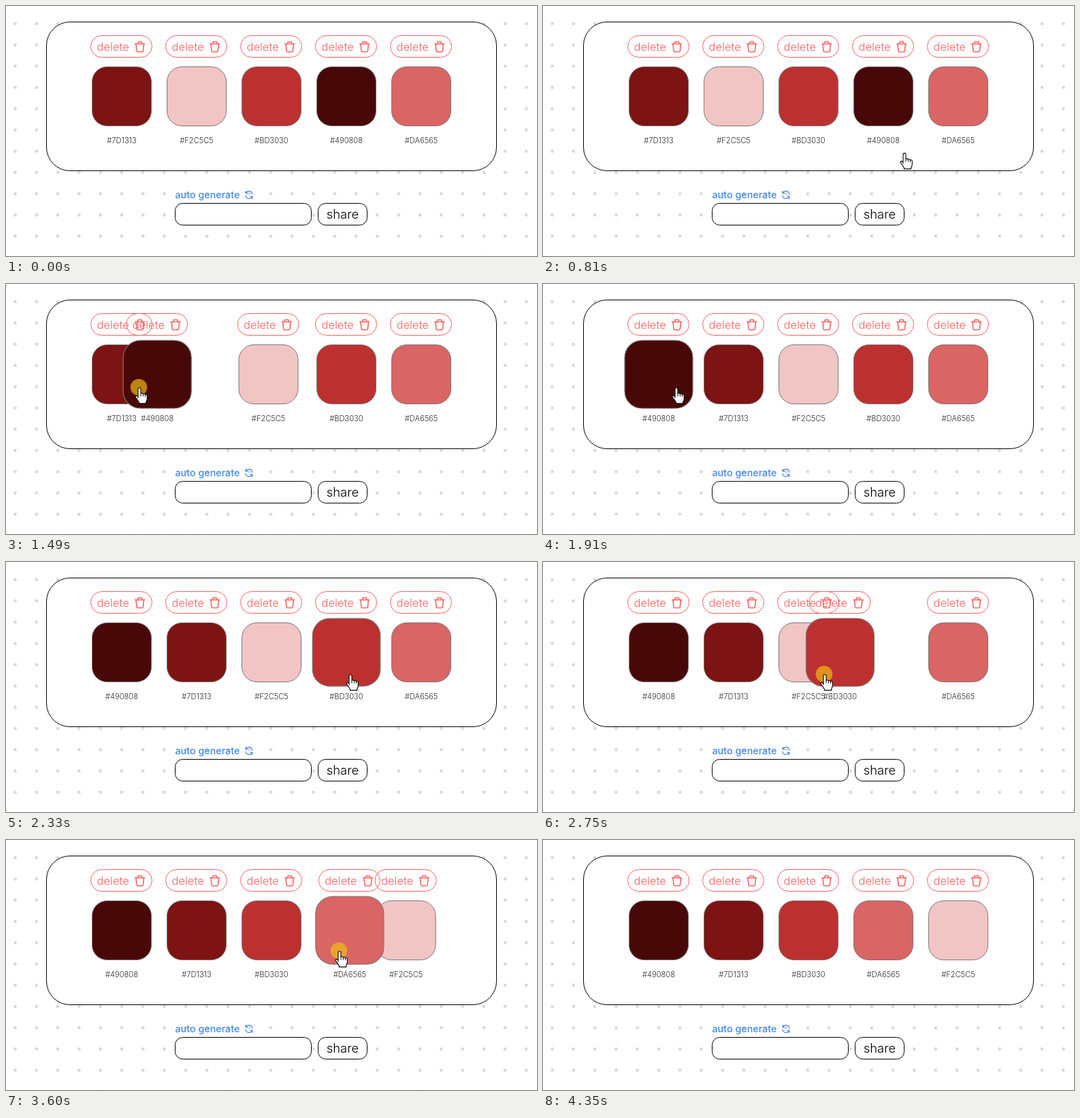
An HTML page that plays this animation: 780x368 px, repeating every 4880 ms.

```html
<!DOCTYPE html>
<html lang="en">
<head>
<meta charset="utf-8">
<title>Palette sorter</title>
<style>
  html, body { margin: 0; width: 100%; height: 100%; overflow: hidden; background: #fff; }
  svg { display: block; font-family: Inter, "Open Sans", sans-serif; }
  .box { fill: #fff; stroke: #000; }
  .delete { fill: none; stroke: #fb6260; }
  .delete text { fill: #fb6260; stroke: none; font-size: 16.5px; font-weight: 300; }
  .trash { stroke-width: 1.6; stroke-linecap: round; stroke-linejoin: round; }
  .code { font-size: 11.1px; font-weight: 300; fill: #2b2b2b; text-anchor: middle; }
  .auto { font-size: 14.3px; font-weight: 500; fill: #4088ea; }
  .refresh { fill: none; stroke: #4088ea; stroke-width: 1.2; stroke-linecap: round; stroke-linejoin: round; }
  .share { font-size: 18.4px; font-weight: 300; text-anchor: middle; }
</style>
</head>
<body>
<svg width="780" height="368" viewBox="0 0 780 368">
  <defs>
    <pattern id="dots" x="-2.15" y="10.4" width="31.29" height="31.29" patternUnits="userSpaceOnUse">
      <circle cx="15.65" cy="15.65" r="2.4" fill="#d9d9d9"/>
    </pattern>
  </defs>
  <rect width="780" height="368" fill="url(#dots)"/>
  <rect class="box" x="59.5" y="23.5" width="661" height="219" rx="34.5"/>
  <text class="auto" x="248.5" y="283">auto generate</text>
  <g class="refresh">
    <path id="arrow" d="M352 275.6V272.6M352 275.6H355M352.2 275.4A5.2 5.2 0 0 1 362 277.2"/>
    <use href="#arrow" transform="rotate(180 356.9 278)"/>
  </g>
  <rect class="box" x="248.5" y="290.5" width="200" height="32" rx="11"/>
  <rect class="box" x="458.5" y="290.5" width="72" height="32" rx="11"/>
  <text class="share" x="494.5" y="313">share</text>
  <g id="swatches"></g>
  <g id="cursor">
    <circle id="press" r="12.3" fill="#f0c010" fill-opacity=".68"/>
    <g transform="translate(1 .5)" stroke="#000" stroke-linejoin="round">
      <path fill="#fff" stroke-width="1.1"
        d="M-2 15V2.2a2 2 0 0 1 4 0V8.6q2-1 3.4.7 2-.9 3 .8 2.6-.5 2.9 2v4.4q0 2.6-1.6 4.6V23.4H-.6V21.6q-1.3-1.6-2.6-4l-2.4-3.4q-.8-2 1-2.3 1.2-.1 2.6 1.9Z"/>
      <path fill="none" d="M2 8.6V13M5.4 9.5V13M8.4 10.4V13.4"/>
    </g>
  </g>
</svg>
<script>
const LOOP = 4880, SHOW = 670, HIDE = 4340;
const STEP = 69.77;                   // the picture advances in even steps
const FIRST_X = 170, PITCH = 110, TILE_Y = 133, TILE_HALF = 44;
const HOVER_MS = 200, HOVER_GROWTH = 0.15, HOVER_SAMPLES = 20;
const SHIFT_MS = 200, SHIFT_AT = 0.6; // a neighbour yields after this share of a slot
const PRESS_LEAD = 70;

const colors = ['#7D1313', '#F2C5C5', '#BD3030', '#490808', '#DA6565'];

const drags = [
  { from: 3, to: 0, start: 1170, duration: 560 },
  { from: 3, to: 2, start: 2672, duration: 260 },
  { from: 4, to: 3, start: 3395, duration: 260 },
];

const cursorHome = { x: 540, y: 346 };
const cursorMoves = [
  { start: 670, duration: 330, x: 525, y: 151 },
  { start: 1125, duration: 380, x: 195, y: 152 },
  { start: 1940, duration: 390, x: 505, y: 165 },
  { start: 2627, duration: 246, x: 390, y: 165 },
  { start: 3012, duration: 236, x: 599, y: 166 },
  { start: 3350, duration: 230, x: 489, y: 163 },
  { start: 4000, duration: 320, x: 474, y: 334 },
];

const clamp01 = v => Math.max(0, Math.min(1, v));
const easeOut = p => 1 - (1 - p) ** 2;
const easeOutInverse = v => 1 - Math.sqrt(1 - v);
const progress = (move, t) => easeOut(clamp01((t - move.start) / move.duration));

const layer = document.getElementById('swatches');
const cursor = document.getElementById('cursor');
const press = document.getElementById('press');

const items = colors.map((color, slot) => {
  const node = document.createElementNS('http://www.w3.org/2000/svg', 'g');
  node.innerHTML = `
    <rect class="tile" x="-43.5" y="89.5" width="87" height="87" rx="22" fill="${color}" stroke="#777"/>
    <g class="delete">
      <rect x="-45.5" y="43.5" width="90" height="32" rx="16"/>
      <text x="-36.5" y="65.5">delete</text>
      <path class="trash" d="M19.7 55.7H33.7M23.2 55.5L24.2 52.7H29.2L30.2 55.5M21 56L22 66Q22.2 67.5 23.6 67.5H29.8Q31.2 67.5 31.4 66L32.4 56"/>
    </g>
    <text class="code" y="202">${color}</text>`;
  layer.appendChild(node);
  return { node, tile: node.querySelector('.tile'), slot, shifts: [] };
});

// Turn each drag into slot shifts for the dragged item and the ones it passes.
const order = [...items];
for (const drag of drags) {
  const { from, to, start, duration } = drag;
  const count = Math.abs(to - from), dir = Math.sign(to - from);
  drag.item = order[from];
  drag.item.shifts.push({ start, duration, slots: to - from });
  for (let k = 0; k < count; k++) {
    const passed = start + duration * easeOutInverse((k + SHIFT_AT) / count);
    order[from + dir * (k + 1)].shifts.push({ start: passed, duration: SHIFT_MS, slots: -dir });
  }
  order.splice(to, 0, ...order.splice(from, 1));
}

const itemX = (item, t) => FIRST_X + PITCH * item.shifts.reduce(
  (slot, shift) => slot + shift.slots * progress(shift, t), item.slot);

function cursorAt(t) {
  let { x, y } = cursorHome;
  for (const move of cursorMoves) {
    const p = progress(move, t);
    x += (move.x - x) * p;
    y += (move.y - y) * p;
  }
  return { x, y };
}

const activeDrag = t => drags.find(({ start, duration }) =>
  t >= start - PRESS_LEAD && t < start + duration);

function isHovered(item, t) {
  const drag = activeDrag(t);
  if (drag) return drag.item === item;
  const { x, y } = cursorAt(t);
  return Math.abs(x - itemX(item, t)) < TILE_HALF && Math.abs(y - TILE_Y) < TILE_HALF;
}

// Share of the recent past spent hovered, so tiles grow and shrink smoothly.
function hoverAmount(item, t) {
  let hits = 0;
  for (let i = 0; i < HOVER_SAMPLES; i++) {
    if (isHovered(item, t - i * HOVER_MS / HOVER_SAMPLES)) hits++;
  }
  return Math.sin(hits / HOVER_SAMPLES * Math.PI / 2);
}

function snap(t) {
  return Math.max(0, SHOW + Math.floor((t - SHOW) / STEP + 0.3) * STEP);
}

function render(time) {
  const t = snap(time);
  for (const item of items) {
    const scale = 1 + HOVER_GROWTH * hoverAmount(item, t);
    item.node.setAttribute('transform', `translate(${itemX(item, t)} 0)`);
    item.tile.setAttribute('transform',
      `translate(0 ${TILE_Y}) scale(${scale}) translate(0 ${-TILE_Y})`);
  }
  const drag = activeDrag(t);
  if (drag && layer.lastChild !== drag.item.node) layer.appendChild(drag.item.node);

  const { x, y } = cursorAt(t);
  cursor.setAttribute('transform', `translate(${x} ${y})`);
  cursor.setAttribute('visibility', t >= SHOW && t < HIDE ? 'visible' : 'hidden');
  press.setAttribute('opacity', drag ? 1 : 0);
}

const begin = performance.now();
function tick() {
  render((performance.now() - begin) % LOOP);
  requestAnimationFrame(tick);
}
render(0);
requestAnimationFrame(tick);
</script>
</body>
</html>
```
